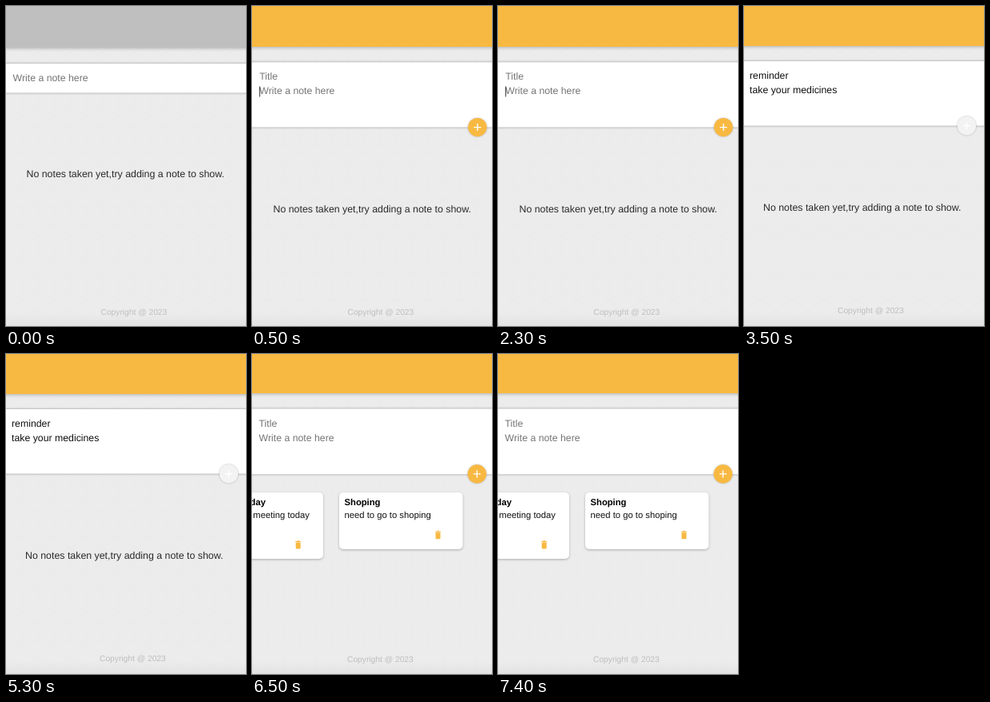
Recreate the animation shown at these times as an HTML page. Size 300 by 400 pixels, loop 8 s.

```html
<!DOCTYPE html>
<html lang="en">
<head>
<meta charset="utf-8">
<title>Notes</title>
<style>
html, body { margin: 0; width: 100%; height: 100%; overflow: hidden; background: #ececec; }
svg { display: block; width: 100%; height: 100%; font-family: "Liberation Sans", Arial, sans-serif; text-rendering: geometricPrecision; }
.header { filter: drop-shadow(0 1px 2px #0004); }
.form { fill: #fff; filter: drop-shadow(0 .7px 1.4px #0006); }
.card { fill: #fff; filter: drop-shadow(0 1px 1.5px #0004); }
.fab { filter: drop-shadow(0 .8px 1.2px #0004); }
</style>
</head>
<body>
<svg viewBox="0 0 300 400">
  <defs>
    <pattern id="cubes" width="40" height="46" patternUnits="userSpaceOnUse">
      <path d="M0 12L20 0L40 12M0 12L20 23L40 12M0 12V35L20 46L40 35V12M20 23V46" fill="none" stroke="#e8e8e8" stroke-width=".7"/>
    </pattern>
    <linearGradient id="floor" x2="0" y2="1">
      <stop offset="0" stop-color="#000" stop-opacity="0"/>
      <stop offset="1" stop-color="#000" stop-opacity=".04"/>
    </linearGradient>
  </defs>
  <rect width="300" height="400" fill="#ececec"/>
  <rect id="paper" width="300" height="400" fill="url(#cubes)"/>
  <rect y="384" width="300" height="16" fill="url(#floor)"/>
  <g id="scene"></g>
</svg>
<script>
const AMBER = '#f8b942', GREY = '#757575';
const scene = document.getElementById('scene');
const paper = document.getElementById('paper');

const text = (x, y, str, fill = GREY, size = 12.3, extra = '') =>
  `<text x="${x}" y="${y}" fill="${fill}" font-size="${size}" ${extra}>${str}</text>`;

const header = (height, fill = AMBER) =>
  `<rect class="header" x="-9" y="-9" width="318" height="${height + 9}" fill="${fill}"/>`;

const form = (top, bottom) =>
  `<rect class="form" x="-6" y="${top}" width="312" height="${bottom - top}"/>`;

const fab = (x, y, fill = AMBER) =>
  `<g class="fab"><circle cx="${x}" cy="${y}" r="11.7" fill="${fill}"/></g>
   <path d="M${x - 4.5} ${y}h9M${x} ${y - 4.5}v9" stroke="#fff" stroke-width="1.4"/>`;

const empty = (x, y) => text(x, y, 'No notes taken yet,try adding a note to show.', '#2a2a2a', 12.36);
const footer = (x, y) => text(x, y, 'Copyright @ 2023', '#bebebe', 10.25);

const bin = (x, y) =>
  `<path d="M${x} ${y + 1}h2l.7-1h1.6l.7 1h2v1h-7zM${x + .5} ${y + 2.5}h6v7q0 1-1 1h-4q-1 0-1-1z" fill="${AMBER}"/>`;

const card = (x, width, height) =>
  `<rect class="card" x="${x}" y="173" width="${width}" height="${height}" rx="5"/>`;

const states = [
  { start: 0, svg: header(52, '#bfbfbf') + form(72, 108.5) +
      text(8.5, 93.6, 'Write a note here') + empty(25.5, 214.3) + footer(118.5, 386) },
  { start: 500, svg: header(51) + form(70.3, 151.5) +
      text(9.3, 92.4, 'Title') + text(9.3, 110.4, 'Write a note here') +
      '<path d="M9.7 100.5v13" stroke="#333"/>' +
      fab(281.8, 151.6) + empty(26.5, 257.5) + footer(119.5, 386) },
  { start: 3500, svg: header(50) + form(69, 149.6) +
      text(7, 90.8, 'reminder', '#111') + text(7, 108.5, 'take your medicines', '#111') +
      fab(278.4, 149.7, '#f3f3f3') + empty(24, 255.5) + footer(117, 383.7) },
  { start: 6500, svg: header(49) + form(68.5, 150.3) +
      text(8.5, 90.8, 'Title') + text(8.5, 108.5, 'Write a note here') + fab(281.3, 149.9) +
      card(-20, 109, 83) + card(109, 154.5, 71) +
      text(17, 188.5, 'Today', '#000', 11.25, 'font-weight="bold" text-anchor="end"') +
      text(72, 205, 'meeting today', '#111', 11.25, 'text-anchor="end"') +
      text(115.5, 188.5, 'Shoping', '#000', 11.25, 'font-weight="bold"') +
      text(115.5, 205, 'need to go to shoping', '#111', 11.25) +
      bin(54.2, 233) + bin(229, 220.7) + footer(119, 384.5) },
];

let shown;
function draw() {
  const t = performance.now() % 8000;
  const state = states.findLast(s => t >= s.start);
  if (state !== shown) {
    shown = state;
    scene.innerHTML = state.svg;
    paper.setAttribute('opacity', state.start === 6500 ? .4 : 1);
  }
  requestAnimationFrame(draw);
}
draw();
</script>
</body>
</html>
```
